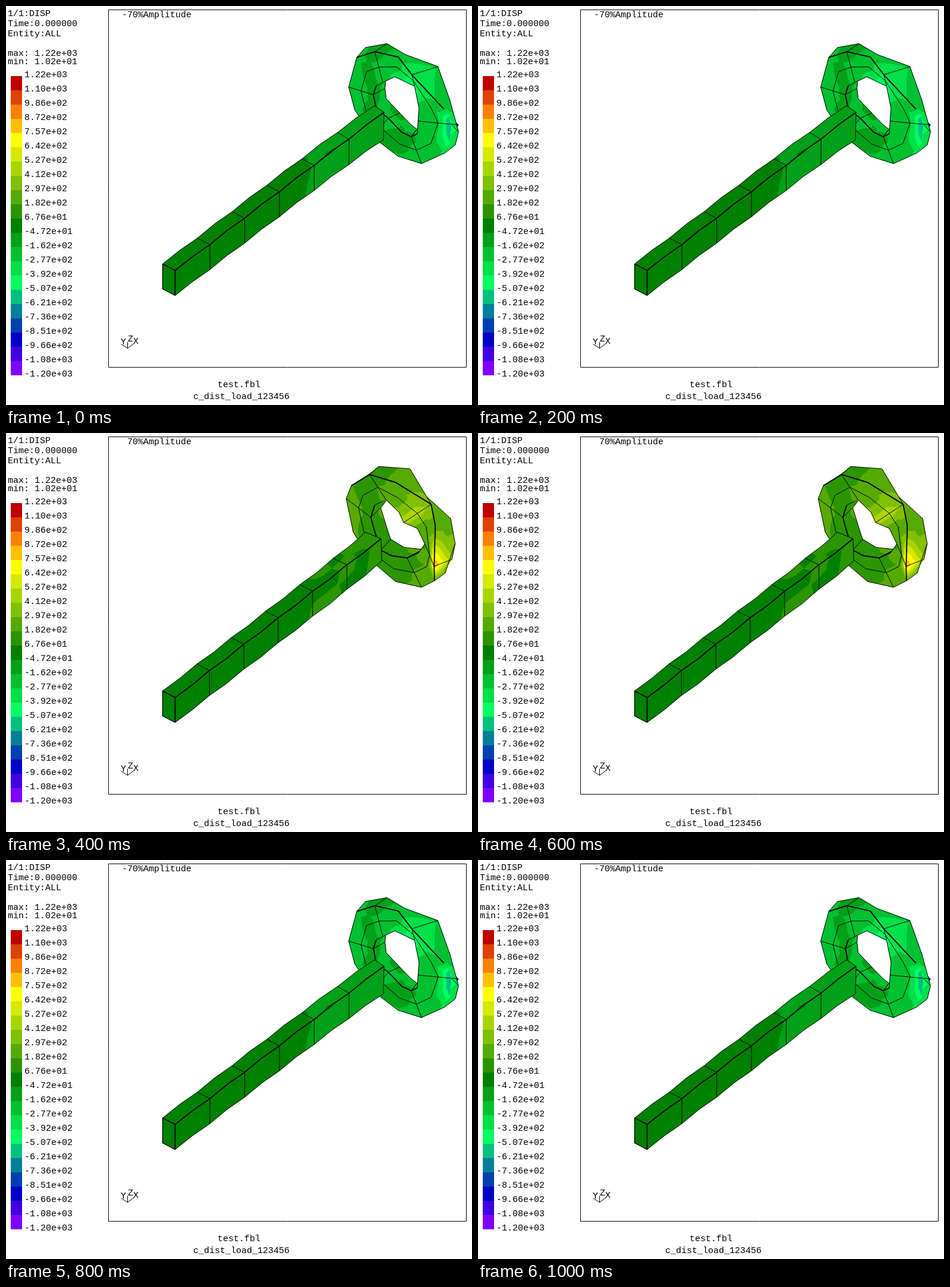
An HTML page with a canvas that plays this animation: 784x672 px, repeating every 1100 ms.

```html
<!DOCTYPE html>
<html lang="en">
<head>
<meta charset="utf-8">
<title>Displacement animation</title>
<style>
  html, body { margin: 0; width: 100%; height: 100%; overflow: hidden; background: #fff; }
  canvas { display: block; }
</style>
</head>
<body>
<canvas id="stage" width="784" height="672"></canvas>
<script>
const ctx = document.getElementById('stage').getContext('2d');
const MAX = 1220, MIN = -1200, STEP = 100, STEPS = 11;
const palette = ('c00000 e04000 ff8000 ffc000 ffff00 d4ea00 aad400 80c000 55aa00 2a9500 008000 ' +
  '00a018 00c030 00e048 00ff60 00c080 008098 0040b0 0000c8 4000e4 8000ff').split(' ').map(c => '#' + c);
const labels = ('1.22e+03 1.10e+03 9.86e+02 8.72e+02 7.57e+02 6.42e+02 5.27e+02 4.12e+02 2.97e+02 1.82e+02 6.76e+01 ' +
  '-4.72e+01 -1.62e+02 -2.77e+02 -3.92e+02 -5.07e+02 -6.21e+02 -7.36e+02 -8.51e+02 -9.66e+02 -1.08e+03 -1.20e+03').split(' ');

// Ring nodes, 30 degrees apart: dx, dy and value at full amplitude.
const outerFront = [
  [-28.6, 17, 1230], [-10, -12, 330], [23, 3, 560], [-3.5, -2, 300], [-6.4, -5, 180], [-6.4, 1.4, 270],
  [-3, -18.5, 400], [-2, -6, 300], [-2, -4, 180], [-3, -2, 240], [0, -4, 290], [-12, .7, 420]];
const outerBack = [
  [-4, -18, 520], [1, -10, 260], [-13.6, 3.5, 380], [6, -15, 330], [-10, -5, 140], [-1.5, 6, 250],
  [0, 0, 200], [0, 0, 200], [0, 0, 200], [0, 0, 200], [0, 0, 200], [-12, 1.4, 460]];
const innerFront = [
  [8, -5, 230], [-2, -8, 330], [-13, 11, 680], [5, 10, 480], [4, -11.5, 300], [-2, -9, 200],
  [-3, -5, 150], [-2, -6, 230], [-9, 6, 260], [-12, -4, 220], [-5, -7, 190], [2, -10, 280]];
const innerBack = [
  [-5, -9, 300], [0, 0, 240], [-11, -1, 210], [-8, -5, 250], [7, -8, 330], [2, -6, 300]];
const beamEnd = { top: [60, 130, 75, 130, 150], front: [75, 60, 120, 80, 130], bottom: [115, 140, 75, 90, 130] };

const average = (...list) => [0, 1, 2].map(k => list.reduce((sum, p) => sum + p[k], 0) / list.length);
const range = (from, to) => Array.from({ length: to - from + 1 }, (_, k) => from + k);

function bandColor(v) {
  return palette[Math.max(0, Math.min(20, Math.floor((MAX - v) / (MAX - MIN) * 21)))];
}

// Linear gradient with hard stops, following the value across a triangle.
function bandFill(p, q, r) {
  const ax = q[0] - p[0], ay = q[1] - p[1], av = q[2] - p[2];
  const bx = r[0] - p[0], by = r[1] - p[1], bv = r[2] - p[2];
  const det = ax * by - bx * ay;
  if (Math.abs(det) < .5 || Math.abs(av) + Math.abs(bv) < 1) return bandColor(p[2]);
  const gx = (av * by - bv * ay) / det, gy = (bv * ax - av * bx) / det, g2 = gx * gx + gy * gy;
  const at = v => [p[0] + gx * (v - p[2]) / g2, p[1] + gy * (v - p[2]) / g2];
  const fill = ctx.createLinearGradient(...at(MAX), ...at(MIN));
  palette.forEach((c, i) => {
    fill.addColorStop(i / 21, c);
    fill.addColorStop((i + 1) / 21, c);
  });
  return fill;
}

function trace(points) {
  ctx.beginPath();
  points.forEach(p => ctx.lineTo(p[0], p[1]));
}

function line(points, width = 1) {
  trace(points);
  ctx.strokeStyle = '#000';
  ctx.lineWidth = width;
  ctx.stroke();
}

function quad(...corners) {
  const mid = average(...corners);
  corners.forEach((p, i) => {
    const q = corners[(i + 1) % 4];
    trace([p, q, mid]);
    ctx.closePath();
    ctx.fillStyle = ctx.strokeStyle = bandFill(p, q, mid);
    ctx.lineWidth = .8;
    ctx.fill();
    ctx.stroke();
  });
}

function drawRing(a) {
  const node = (i, radius, depth, [dx, dy, v]) => {
    const c = Math.cos(i * Math.PI / 6) * radius, s = Math.sin(i * Math.PI / 6) * radius;
    return [657 + 83 * c + 18 * depth + dx * a, 167.5 + 44.5 * c - 83.5 * s - 13.5 * depth + dy * a, v * a];
  };
  const next = i => (i + 1) % 12;
  const front = outerFront.map((d, i) => node(i, 1, 0, d));
  const back = outerBack.map((d, i) => node(i, 1, 1, d));
  const inner = innerFront.map((d, i) => node(i, .5, 0, d));
  const innerFar = range(0, 11).map(i => node(i, .5, 1, innerBack[i - 6] || [0, 0, 200]));
  const middle = front.map((p, i) => {
    const m = average(p, inner[i]);
    m[2] *= i % 2 ? .75 : i ? 1.1 : .5;
    return m;
  });
  const rim = front.map((p, i) => average(p, back[i]));
  rim[0] = node(0, 1, .5, [1, 10, 640]);

  for (const i of range(5, 10)) {
    quad(inner[i], inner[i + 1], innerFar[i + 1], innerFar[i]);
    line([innerFar[i], innerFar[i + 1]]);
    if (i % 2 == 0) line([inner[i], innerFar[i]]);
  }
  line([inner[10], innerFar[10]]);

  const drawFace = () => {
    for (const i of range(0, 11)) {
      const j = next(i);
      quad(inner[i], inner[j], middle[j], middle[i]);
      quad(middle[i], middle[j], front[j], front[i]);
    }
    line([...middle, middle[0]]);
    for (const i of range(0, 5)) line([inner[2 * i], middle[2 * i], front[2 * i]]);
    line([...inner, inner[0]]);
    line(inner.slice(5), 1.8);
    line([...front, front[0]]);
  };
  const drawRim = () => {
    const strips = [4, 3, 2, 1, 0, 11];
    for (const i of strips) quad(front[i], front[next(i)], rim[next(i)], rim[i]);
    for (const i of strips) {
      const j = next(i);
      quad(rim[i], rim[j], back[j], back[i]);
      line([back[i], back[j]]);
    }
    for (const i of [0, 2, 4, 5, 11]) line([front[i], rim[i], back[i]]);
    line(front.slice(1, 6), 1.8);
  };
  // The rim folds over the face on the negative half of the swing.
  if (a < 0) {
    drawFace();
    drawRim();
  } else {
    drawRim();
    drawFace();
    line([...front.slice(0, 6).reverse(), front[11]], 1.8);
  }
}

function drawBeam(a) {
  const edge = (x, y, bendX, bendY, values) => range(0, 12).map(i => {
    const s = i / 12, ripple = i % 12 ? (i % 2 ? 1.4 : -1.4) : 0;
    return [
      x + 349 * s + a * (-3 * s + bendX * s ** 6),
      y - 267 * s + a * (ripple + bendY * s ** 8),
      a * (i < 8 ? i * 3 : values[i - 8])];
  });
  const top = edge(263, 434, -7.7, -.7, beamEnd.top);
  const front = edge(284, 445, -.6, -.7, beamEnd.front);
  const bottom = edge(284, 487, 1, -7, beamEnd.bottom);
  const corner = [263, 476, 0];

  quad(top[0], front[0], bottom[0], corner);
  for (const i of range(0, 11)) {
    quad(top[i], top[i + 1], front[i + 1], front[i]);
    quad(front[i], front[i + 1], bottom[i + 1], bottom[i]);
  }
  for (const i of range(0, 6)) line([top[2 * i], front[2 * i], bottom[2 * i]]);
  line(top);
  line(bottom);
  line(front, 1.8);
  line([top[0], corner, bottom[0]], 1.4);
  line([top[0], front[0], bottom[0]], 1.8);
}

function text(str, x, y, align = 'left') {
  ctx.fillStyle = '#000';
  ctx.textAlign = align;
  ctx.fillText(str, x, y);
}

function drawFrame(n) {
  const a = -Math.sin((n + 1) * Math.PI / 4);
  ctx.fillStyle = '#fff';
  ctx.fillRect(0, 0, 784, 672);

  ctx.font = '15px "Liberation Mono", monospace';
  text('1/1:DISP', 3, 17);
  text('Time:0.000000', 3, 34);
  text('Entity:ALL', 3, 51);
  text('max: 1.22e+03', 3, 84);
  text('min: 1.02e+01', 3, 98);
  labels.forEach((label, i) => text(label, 31, 120 + 24 * i));
  palette.forEach((c, i) => {
    ctx.fillStyle = c;
    ctx.fillRect(8, 118 + 24 * i, 19, 24);
  });
  text(Math.trunc(100 * a) + '%Amplitude', 312, 19, 'right');
  text('test.fbl', 356, 642);
  text('c_dist_load_123456', 315, 662);

  ctx.save();
  ctx.translate(.5, .5);
  ctx.lineJoin = 'round';
  line([[172, 6], [774, 6], [774, 608], [172, 608], [172, 6]]);
  line([[193, 569], [204, 576], [215, 568]]);
  line([[204, 576], [204, 565]]);
  drawRing(a);
  drawBeam(a);
  ctx.restore();
  text('Y', 193, 570);
  text('Z', 205, 565);
  text('X', 214, 569);
}

const start = performance.now();
let shown = -1;
function tick() {
  const n = Math.floor((performance.now() - start) / STEP) % STEPS;
  if (n !== shown) drawFrame(shown = n);
  requestAnimationFrame(tick);
}
tick();
</script>
</body>
</html>
```
